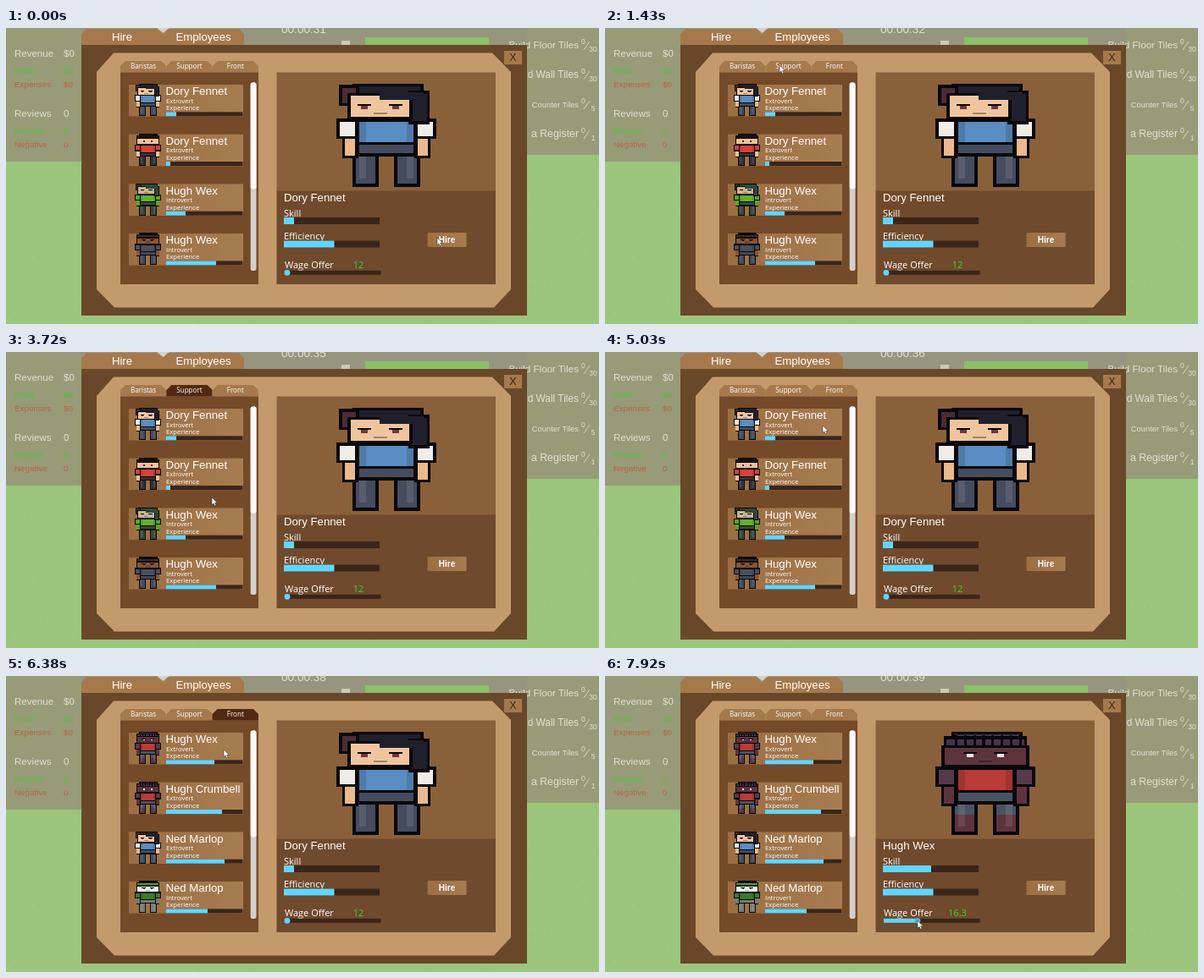
An HTML page for the animation above (8000 ms loop, 700x350 px).

```html
<!DOCTYPE html>
<html lang="en">
<head>
<meta charset="utf-8">
<title>Hiring menu</title>
<style>
  html, body { margin: 0; width: 100%; height: 100%; overflow: hidden; background: #9bc57c; }
  svg { display: block; width: 100vw; height: 100vh; }
  text { font-family: "Liberation Sans", Arial, sans-serif; fill: #fff; white-space: pre; }
  .soft { font-family: "Open Sans", "Noto Sans", sans-serif; }
  .middle { text-anchor: middle; }
  .end { text-anchor: end; }
  .bold { font-weight: bold; }
</style>
</head>
<body>
<svg id="stage" viewBox="0 0 700 350"></svg>
<script>
const NS = 'http://www.w3.org/2000/svg';
const stage = document.getElementById('stage');
const LOOP = 8000, STEP = 140;
const TAB = '#a6794c', SELECTED = '#4f2912', BLUE = '#62d5ff', TRACK = '#3b251a';
const PANEL = '#744a29', FRAME = '#694829', TAN = '#c49a6c', INK = '#0a080b';

function add(parent, tag, attrs = {}) {
  const node = document.createElementNS(NS, tag);
  for (const key in attrs) node.setAttribute(key, attrs[key]);
  return parent.appendChild(node);
}
const rect = (parent, x, y, width, height, fill, rx = 0) =>
  add(parent, 'rect', { x, y, width, height, fill, rx });
const shape = (points, fill) => add(stage, 'polygon', { points, fill });
function text(parent, str, x, y, size, className = '', fill = '#fff') {
  const node = add(parent, 'text', { x, y, 'font-size': size, class: className, style: `fill:${fill}` });
  node.textContent = str;
  return node;
}
function meter(parent, x, y, width, height, amount) {
  rect(parent, x, y, width, height, TRACK);
  return rect(parent, x, y, amount, height, BLUE);
}
const show = (node, on) => node.setAttribute('visibility', on ? 'visible' : 'hidden');

// ---- Pixel people: outlined blocks, mirrored where a body is ----
const PEOPLE = {
  tied:   { hair: '#20202d', bun: '#4b2c36', skin: '#f0c59e', shirt: '#5b8dc2', sleeve: '#f0ece8', hand: '#eab98d', pants: '#454c5e', eye: '#713747' },
  coral:  { hair: '#1c1519', skin: '#efc19a', shirt: '#d34536', sleeve: '#d34536', hand: '#efc19a', pants: '#33333a', eye: '#3d2420' },
  lime:   { hair: '#2d4a3c', bun: '#26363d', skin: '#d0b48c', shirt: '#63b32b', sleeve: '#58a628', hand: '#58a628', pants: '#3a4a38', eye: '#46c0e8' },
  denim:  { hair: '#3c2b24', skin: '#8a5434', shirt: '#4a505e', sleeve: '#4a505e', hand: '#8a5434', pants: '#434a59', eye: '#2a1a14' },
  braids: { hair: '#43344a', skin: '#5d343d', shirt: '#b93c38', sleeve: '#553a4e', hand: '#5d343d', pants: '#4a5362', eye: '#f0e5e5', striped: true, shin: '#5d343d' },
  hooded: { hair: '#46a13a', skin: '#e9f5e5', shirt: '#3d7a2a', sleeve: '#3d7a2a', hand: '#777d77', pants: '#777d77', eye: '#2c6b25' }
};

function person(parent, name, x, y, width, height) {
  const look = PEOPLE[name];
  const g = add(parent, 'g', { transform: `translate(${x} ${y}) scale(${width / 30} ${height / 30.5})` });
  g.setAttribute('shape-rendering', 'crispEdges');
  const fill = (color, x, y, w, h) => rect(g, x, y, w, h, color);
  const part = (color, x, y, w, h, edge = .9) => {
    fill(INK, x - edge, y - edge, w + 2 * edge, h + 2 * edge);
    fill(color, x, y, w, h);
  };
  const pair = (draw, color, x, ...[y, w, h]) => [x, 30 - x - w].forEach(side => draw(color, side, y, w, h));

  pair(part, look.pants, 6, 20, 5.8, 9.5);
  if (look.shin) pair(fill, look.shin, 6, 24.5, 5.8, 5);
  pair(fill, '#ffffff18', 7, 20, 2, 8);
  pair(part, look.hand, 2.8, 15, 3, 6.2);
  pair(part, look.sleeve, 1.2, 11.2, 4.6, 4.2);
  part(look.pants, 7, 17.5, 16, 3);
  part(look.shirt, 7, 11.2, 16, 6);
  pair(fill, '#0002', 7, 11.2, 2, 6);

  part(look.hair, 6, .8, 19, 3);
  if (look.bun) {
    part(look.bun, 2, 1.2, 4, 4.5);
    part(look.hair, 22.5, 3, 4.4, 8);
    part(look.skin, 4.4, 3.6, 17.4, 6.1);
    fill(look.hair, 13, 2.4, 13, 2.3);
  } else {
    part(look.hair, 3.6, 2.2, 22.8, 4);
    part(look.skin, 3, 4.8, 24, 4.9);
  }
  if (look.striped) for (let i = 6; i < 25; i += 2.7) fill(INK, i, 1, .8, 3);
  const center = look.bun ? 13.2 : 15;
  for (const side of [-1, 1]) {
    const eye = center + side * 4.6;
    fill(INK, eye - 2, 6, 4, .6);
    fill(look.eye, eye - 1, 6.6, 2, .9);
  }
  fill('#0005', center - 2, 8.5, 4, .5);
  return g;
}

// ---- Ground and the game display behind the menu ----
rect(stage, 0, 0, 700, 350, '#9bc57c');
let seed = 7;
const random = () => (seed = seed * 16807 % 2147483647) / 2147483647;
for (let i = 0; i < 420; i++) {
  const x = random() * 700, y = random() * 350, length = 2 + random() * 3;
  add(stage, 'path', {
    d: `M${x.toFixed(1)} ${y.toFixed(1)}l${length} ${length}`,
    stroke: i % 2 ? '#a5cc87' : '#91bc73', opacity: .65
  });
}
const HAZE = '#979b77';
rect(stage, 0, 0, 89, 158, HAZE);
rect(stage, 615, 0, 85, 150, HAZE);
rect(stage, 89, 0, 526, 20, '#98957f');
rect(stage, 424, 11, 146, 10, '#8abf68');
rect(stage, 396, 15, 10, 9, '#c9c8ba');

const PALE = '#e0e1d4', GREEN = '#55c140', RED = '#bb6247';
[['Revenue', '$0', 'Profit', 'Expenses'], ['Reviews', '0', 'Positive', 'Negative']].forEach(([title, value, good, bad], i) => {
  const top = 34 + i * 71;
  [[title, 0, 11.5, PALE], [good, 20, 9.8, GREEN], [bad, 35.5, 9.8, RED]].forEach(([label, drop, size, color]) => {
    text(stage, label, 10, top + drop, size, '', color);
    text(stage, value, 68, top + drop, size, '', color);
  });
});
[['- Build Floor Tiles', 30, 11.6], ['- Build Wall Tiles', 30, 11.9], ['Counter Tiles', 5, 9.4], ['a Register', 1, 12.3]]
  .forEach(([label, goal, size], i) => {
    const y = 24 + i * 35;
    text(stage, label, 676, y, size, 'end', PALE);
    text(stage, '0', 679, y - 5, 8.5, '', PALE);
    text(stage, goal, 693, y + 4, 8.5, 'middle', PALE);
    add(stage, 'path', { d: `M682 ${y + 2}l7-10`, stroke: PALE, 'stroke-width': .8 });
  });
const clock = text(stage, '', 325, 6.2, 13.6, '', PALE);

// ---- Menu frame ----
function tab(label, x, y, width, height, size, className = 'middle') {
  const right = x + width, bottom = y + height, cut = 6;
  const node = shape(`${x},${bottom} ${x},${y + cut} ${x + cut},${y} ${right - cut},${y} ${right},${y + cut} ${right},${bottom}`, TAB);
  text(stage, label, x + width / 2, bottom - 4.7, size, className);
  return node;
}
shape('178,0 193,0 186,6', '#d5d2cb');
tab('Hire', 89, 1, 96, 19, 13.2);
tab('Employees', 185, 1, 96, 19, 13.2);
rect(stage, 89, 20, 526, 320, FRAME);
shape('127,29.5 574,29.5 596,52 596,309 576,330.5 128,330.5 107,309 107,52', TAN);
rect(stage, 588, 27, 21, 16, TAB);
text(stage, 'X', 598.5, 39.3, 12.5, 'middle', '#3b2413');
const tabs = ['Baristas', 'Support', 'Front'].map((label, i) =>
  tab(label, 135 + i * 54.3, 39, 54.3, 13.7, 8.1, 'soft middle'));

// ---- Candidate lists ----
rect(stage, 135, 52.5, 163, 250.5, PANEL);
const shade = add(add(stage, 'defs'), 'linearGradient', { id: 'card' });
add(shade, 'stop', { 'stop-color': '#9b6f43' });
add(shade, 'stop', { offset: 1, 'stop-color': '#a87c51' });

function candidateList(rows) {
  const g = add(stage, 'g');
  rows.forEach(([name, mood, look, amount], i) => {
    const y = 67 + i * 58.7;
    rect(g, 145, y, 135, 37.5, 'url(#card)');
    person(g, look, 151.5, y - .5, 32, 38);
    text(g, name, 188.5, y + 12.3, 13.2);
    text(g, mood, 189, y + 21.5, 7.65, 'soft');
    text(g, 'Experience', 189, y + 30.2, 7.65, 'soft');
    meter(g, 189, y + 32.3, 90.5, 5, amount);
  });
  return g;
}
const firstList = candidateList([
  ['Dory Fennet', 'Extrovert', 'tied', 12], ['Dory Fennet', 'Extrovert', 'coral', 5],
  ['Hugh Wex', 'Introvert', 'lime', 23], ['Hugh Wex', 'Introvert', 'denim', 59]
]);
const frontList = candidateList([
  ['Hugh Wex', 'Extrovert', 'braids', 57], ['Hugh Crumbell', 'Extrovert', 'braids', 66],
  ['Ned Marlop', 'Extrovert', 'tied', 69], ['Ned Marlop', 'Introvert', 'hooded', 49]
]);
rect(stage, 288.7, 64.5, 6.8, 222.5, '#d3cfcb', 2.5);
rect(stage, 288.7, 64.5, 6.8, 126, '#fbfaf9', 2.5);

// ---- Details of the chosen candidate ----
rect(stage, 319.5, 52.5, 258.5, 140.5, '#8a603b');
rect(stage, 319.5, 192.5, 258.5, 110.5, '#704a2c');
const portraits = ['tied', 'braids'].map(look => person(stage, look, 389, 66, 120, 122));
const chosenName = text(stage, '', 328, 205, 13.2);
text(stage, 'Skill', 328, 222.5, 11, 'soft');
text(stage, 'Efficiency', 328, 249.5, 11, 'soft');
text(stage, 'Wage Offer', 329, 284, 11, 'soft');
const skill = meter(stage, 328, 224, 113, 8, 12);
meter(stage, 328, 251.5, 113, 8, 59.5);
rect(stage, 497.5, 242, 46, 17, 'url(#card)', 1);
text(stage, 'Hire', 520.5, 254, 10, 'bold middle');
const wage = text(stage, '', 416, 284, 11, 'soft middle', '#35d82c');
const wageFill = meter(stage, 329, 286.8, 113.5, 5, 3);
const knob = add(stage, 'circle', { cy: 289.3, r: 3.4 });

const pointer = add(stage, 'path', {
  d: 'M0 0V8.6L2 6.9 3.5 9.8 5 9.1 3.6 6.3H6.4Z', fill: '#fff', stroke: '#222', 'stroke-width': .5
});

// ---- Motion ----
const SPOT = {
  hire: [509, 248], support: [206, 44], scrollbar: [296, 105], list: [243, 172],
  card: [257, 87], front: [268, 44], knob: [332, 289], raise: [369, 289.5]
};
const MOVES = [
  ['support', 120, 1400], ['scrollbar', 2400, 2940], ['list', 2940, 3640], ['card', 4200, 4900],
  ['front', 4900, 5400], ['card', 5700, 6300], ['knob', 6580, 7130], ['raise', 7130, 7840]
];
const progress = (t, start, end) => Math.min(1, Math.max(0, (t - start) / (end - start)));

function pointerAt(t) {
  return MOVES.reduce((from, [spot, start, end]) => {
    const k = progress(t, start, end);
    return from.map((value, i) => value + (SPOT[spot][i] - value) * k);
  }, SPOT.hire);
}

function render(t) {
  const [x, y] = pointerAt(Math.floor(t / STEP) * STEP);
  pointer.setAttribute('transform', `translate(${x} ${y})`);
  clock.textContent = '00:00:' + (32 + Math.floor((t - 820) / 911));

  const hired = t >= 6600, frontOpen = t >= 5720, dragging = t >= 7130;
  tabs[1].setAttribute('fill', t >= 1730 && t < 3990 ? SELECTED : TAB);
  tabs[2].setAttribute('fill', t >= 5440 && !hired ? SELECTED : TAB);
  show(firstList, !frontOpen);
  show(frontList, frontOpen);
  show(portraits[0], !hired);
  show(portraits[1], hired);
  chosenName.textContent = hired ? 'Hugh Wex' : 'Dory Fennet';
  skill.setAttribute('width', hired ? 57 : 12);

  const raised = dragging ? Math.max(0, x - SPOT.knob[0]) : 0;
  const knobX = SPOT.knob[0] + raised;
  knob.setAttribute('cx', knobX);
  knob.setAttribute('fill', dragging ? '#5aaccb' : BLUE);
  wageFill.setAttribute('width', knobX - 329);
  wage.textContent = +(12 + raised * 4.3 / 37).toFixed(1);
}

function tick() {
  render(performance.now() % LOOP);
  requestAnimationFrame(tick);
}
tick();
</script>
</body>
</html>
```
